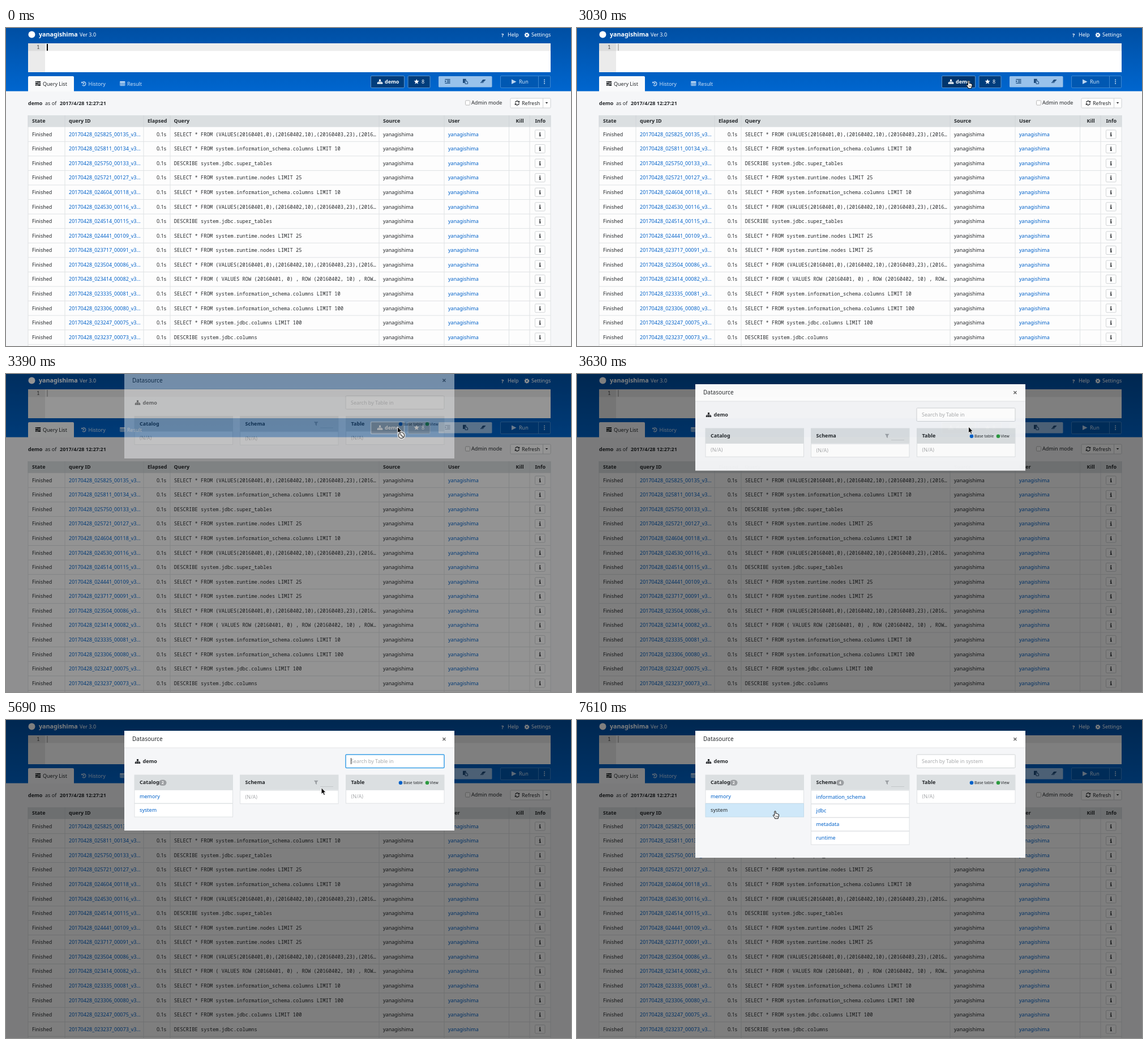
Write an HTML page that moves like this. It is 998x561 px and loops after 8 s.

```html
<!DOCTYPE html>
<html lang="en">
<head>
<meta charset="utf-8">
<title>Query console</title>
<style>
  html, body { margin: 0; width: 100%; height: 100%; overflow: hidden; background: #f5f6f8; }
  svg { display: block; width: 100vw; height: 100vh; }
  text { font: 9px "Noto Sans", sans-serif; white-space: pre; }
  .b { font-weight: 600; }
  .m { font: 8.75px "Noto Sans Mono", monospace; }
</style>
</head>
<body>
<svg id="stage" viewBox="0 0 998 561" preserveAspectRatio="none" xmlns="http://www.w3.org/2000/svg"></svg>
<script>
const LOOP = 8000;
const INK = '#25282b', LINK = '#0061c9', EDGE = '#dfe2e4', HEAD = '#dbdfe1';

// ---- drawing helpers ----
const rect = (x, y, w, h, fill, extra = '') =>
  `<rect x="${x}" y="${y}" width="${w}" height="${h}" fill="${fill}" ${extra}/>`;
const box = (x, y, w, h, fill, edge, r = 0, extra = '') =>
  rect(x + .5, y + .5, w - 1, h - 1, fill, `stroke="${edge}" rx="${r}" ${extra}`);
const text = (x, y, s, fill = INK, extra = '') => `<text x="${x}" y="${y}" fill="${fill}" ${extra}>${s}</text>`;
const bold = (x, y, s, fill = INK, extra = '') => text(x, y, s, fill, `class="b" ${extra}`);
const path = (d, fill, extra = '') => `<path d="${d}" fill="${fill}" ${extra}/>`;
const line = (d, color, w = 1) => path(d, 'none', `stroke="${color}" stroke-width="${w}"`);
const dot = (x, y, r, fill) => `<circle cx="${x}" cy="${y}" r="${r}" fill="${fill}"/>`;
const at = (x, y, s, extra = '') => `<g transform="translate(${x} ${y})" ${extra}>${s}</g>`;

// ---- icons, centred on their position ----
const sitemap = (x, y, c) => at(x, y,
  path('M-1.5-4h3v3h-3zM-4.7 1.2h2.9v2.8h-2.9zM-1.4 1.2h2.8v2.8h-2.8zM1.8 1.2h2.9v2.8h-2.9z', c) +
  line('M0-1V2M-3.2 2V.2H3.2V2', c, .9));
const server = (x, y, c, gap) => at(x, y,
  path('M-4.6-4h9.2v2.3h-9.2zM-4.6-1.1h9.2v2.3h-9.2zM-4.6 1.8h9.2v2.3h-9.2z', c) +
  line('M-3.6-2.8h1.6M0 0h3.6M-3.6 3h4', gap, .7));
const clock = (x, y, c) => at(x, y,
  line('M-2.6-2.2A3.5 3.5 0 1 1-2.5 2.5M.2-1.9V.5H-1.6', c, 1.2) + path('M-4.2-4V-.9H-1z', c));
const grid = (x, y, c) => at(x, y,
  line('M-4-3.4h8v7h-8zM-4-1h8M-4 1.3h8M-1.3-3.4v7M1.3-3.4v7', c, .9) + rect(-4.4, -3.9, 8.8, 1.8, c));
const refresh = (x, y, c) => at(x, y,
  line('M-3.4-.6A3.4 3.4 0 0 1 2.6-2.3M3.4.6A3.4 3.4 0 0 1-2.6 2.3', c, 1.3) +
  path('M4.2-4V-.8H1zM-4.2 4V.8H-1z', c));
const star = (x, y, c) => {
  const pts = Array.from({ length: 10 }, (_, i) => {
    const r = i % 2 ? 2.1 : 4.8, a = i * Math.PI / 5;
    return `${(r * Math.sin(a)).toFixed(2)},${(-r * Math.cos(a)).toFixed(2)}`;
  });
  return at(x, y, `<polygon points="${pts.join(' ')}" fill="${c}"/>`);
};
const gear = (x, y, c) => at(x, y,
  `<circle r="2.4" fill="none" stroke="${c}" stroke-width="2"/>` +
  `<circle r="3.7" fill="none" stroke="${c}" stroke-width="1.4" stroke-dasharray="1.5 1.406"/>`);
const info = (x, y) => at(x, y,
  path('M-1-3.6H.8v1.7H-1zM-1.6-1.2H.8v3.7h.8v1.1h-3.2v-1.1h.8v-2.6h-.8z', INK));
const funnel = (x, y) => at(x, y, path('M-3.8-3.6h7.6L1.2-.3v4L-1.2 2v-2.3z', '#9b9fa3'));

// ---- page ----
function header() {
  const pale = '#cfe1f5', dim = '#b9d4f0', navy = '#1d4b7d';
  return rect(0, 0, 998, 111.5, 'url(#sky)') +
    dot(45.5, 11.5, 6, '#fff') +
    bold(58, 14.8, 'yanagishima', '#fff', 'style="font-size:10.7px"') +
    text(130, 14.8, 'Ver 3.0', '#fff') +
    bold(875, 15.6, '?', '#fff', 'style="font-weight:800"') + text(886, 15.3, 'Help', '#fff') +
    gear(920, 12.3, '#fff') + text(928, 15.3, 'Settings', '#fff') +
    // editor
    rect(39, 27, 923, 51, '#fff') + rect(39, 27, 30, 51, '#ebebeb') +
    rect(39, 27, 30, 13.5, '#dcdcdc') + rect(69, 27, 893, 13.5, '#ededed') +
    text(54.3, 37.2, '1', '#333', 'class="m"') +
    rect(72, 28, 2, 12, '#000', 'id="caret"') + rect(72.5, 28, 1, 12, '#8a8a8a', 'id="thin"') +
    // tabs
    path('M39 112V87q0-2 2-2h77q2 0 2 2v25z', '#f9fafb') +
    server(56.5, 98, INK, '#f9fafb') + text(65, 101.8, 'Query List') +
    clock(137.3, 98.2, pale) + text(145.5, 101.8, 'History', pale) +
    grid(205.8, 98, pale) + text(214, 101.8, 'Result', pale) +
    // buttons
    box(644, 84, 60, 22, '#003d7c', '#5c93cb', 1.5, 'id="source"') +
    sitemap(660.5, 94.8, '#fff') + bold(669, 98, 'demo', '#fff') +
    box(709.5, 84, 40, 22, '#003d7c', '#5c93cb', 1.5) +
    star(725.2, 94.8, '#fff') + text(734, 98, '8', '#fff') +
    rect(764, 85, 94.5, 19.5, '#99c2eb', 'rx="1.5"') +
    at(780, 94, line('M-4.6-3.4h9.2M-1-1.1h5.6M-1 1.1h5.6M-4.6 3.4h9.2', navy, 1.2) + path('M-4.6-2L-2.2 0-4.6 2z', navy)) +
    at(811, 94, path('M-4-4.2h5.6v2.6H-.6V3H-4z', navy) + path('M0-1h2.8v2h1.8v3.5H0z', '#99c2eb', `stroke="${navy}"`)) +
    at(842.5, 94, path('M-.2-3h5.2L.3 3h-5.2z', navy) + line('M-3.4 1.8h3.8L2.6-.8', '#99c2eb', .7)) +
    box(873, 84, 89, 22, '#0058b2', '#3d87d2', 1.5) + line('M940.5 84.5v21', '#3d87d2') +
    path('M893 90.5l8.5 4.3-8.5 4.3z', dim) + text(906, 98, 'Run', '#d5e5f6') +
    [91.5, 94.7, 97.9].map(y => rect(950.2, y - .9, 1.8, 1.8, dim)).join('');
}

function subHeader() {
  return bold(39, 136, 'demo') + text(69, 136, 'as of') + bold(95, 136, '2017/4/28 12:27:21') +
    box(811, 127.5, 9, 9, '#fff', '#b8b8b8', 1.5) + text(822, 135.4, 'Admin mode') +
    box(890.5, 123.5, 72, 18, '#fff', '#cdd0d2', 1.5) + line('M948.5 124v17', '#cdd0d2') +
    refresh(903, 132.3, INK) + text(911, 135.5, 'Refresh') + path('M952.7 131h4.6l-2.3 2.6z', INK);
}

const QUERY = {
  values: 'SELECT * FROM (VALUES(20160401,0),(20160402,10),(20160403,23),(2016…',
  rows: 'SELECT * FROM ( VALUES ROW (20160401, 0) , ROW (20160402, 10) , ROW…',
  info: 'SELECT * FROM system.information_schema.columns LIMIT 10',
  info100: 'SELECT * FROM system.information_schema.columns LIMIT 100',
  tables: 'DESCRIBE system.jdbc.super_tables',
  nodes: 'SELECT * FROM system.runtime.nodes LIMIT 25',
  columns: 'SELECT * FROM system.jdbc.columns LIMIT 100',
  describe: 'DESCRIBE system.jdbc.columns'
};
const JOBS = `025825_00135 values,025811_00134 info,025750_00133 tables,025721_00127 nodes,
024604_00118 info,024530_00116 values,024514_00115 tables,024441_00109 nodes,023717_00091 nodes,
023504_00086 values,023414_00082 rows,023335_00081 info,023306_00080 info100,023247_00075 columns,
023237_00073 describe`.split(',').map(s => s.trim().split(' '));

function jobTable() {
  const pitch = 25.57, top = 174.7;
  let s = rect(39, 154, 923, 407, '#fdfdfd') + rect(39, 154, 923, 20.7, HEAD);
  JOBS.forEach(([id, query], i) => {
    const mid = top + pitch * (i + .5), y = mid + 3.3;
    s += line(`M39 ${top + pitch * (i + 1)}H962`, EDGE) +
      text(46, y, 'Finished') + text(111, y, `20170428_${id}_v3…`, LINK) +
      text(283, y, '0.1s', INK, 'text-anchor="end"') +
      text(296.7, y, QUERY[query], INK, 'class="m"') +
      text(666, y, 'yanagishima') + text(781, y, 'yanagishima', LINK) +
      box(934, mid - 8, 18.5, 16, '#fff', '#cfd2d4', 1.5) + info(943.3, mid);
  });
  for (const x of [39, 104, 243, 290, 659, 774, 888.5, 925, 962]) {
    s += line(`M${x} 154V174.7`, '#d0d5d8') + line(`M${x} 174.7V561`, EDGE);
  }
  const heads = { State: 46, 'query ID': 111, Elapsed: 250, Query: 296.5, Source: 666, User: 781, Kill: 900.5, Info: 934.5 };
  for (const [name, x] of Object.entries(heads)) s += bold(x, 167.2, name);
  return s;
}

// ---- dialog ----
const card = (x, name, h = 27) => rect(x, 96.5, 174.5, h, HEAD) + bold(x + 9.6, 113.3, name);
const cell = (x, y, h, label, color, fill = '#fff', id = '') =>
  box(x, y, 174.5, h, fill, EDGE, 0, id && `id="${id}Bg"`) +
  text(x + 9.6, y + h / 2 + 3.2, label, color, id && `id="${id}"`);
const badge = (x, n) => rect(x, 105.4, 13.5, 10.4, '#9c9fa2', 'rx="5.2"') +
  bold(x + 6.75, 113.2, n, '#fff', 'text-anchor="middle" style="font-size:7px"');
const none = (x, y) => cell(x, y, 24.5, '(N/A)', '#a9abad');

function dialog() {
  return rect(209, 19, 583, 100, '#f5f6f8', 'id="panel"') +
    rect(209, 19, 583, 30, '#fff') + line('M209 49H792', '#e4e6e8') +
    text(223, 37.3, 'Datasource', INK, 'style="font-size:10px"') +
    line('M771.4 31.2l5 5M776.4 31.2l-5 5', '#666', 1.5) +
    sitemap(232.5, 73, INK) + bold(241.5, 76, 'demo') +
    box(599.5, 60.5, 175, 24.5, '#fff', '#cfd2d4', 1.5, 'id="search"') +
    text(609, 76, '', '#a9abad', 'id="hint"') + rect(609, 67, 1, 11, '#333', 'id="searchCaret"') +
    card(226.5, 'Catalog') +
    `<g id="noCatalog">${none(226.5, 123)}</g>` +
    `<g id="catalogs">${badge(270, 2)}${cell(226.5, 123, 24.5, 'memory', LINK)}${cell(226.5, 147, 24.5, 'system', LINK, '#fff', 'pick')}</g>` +
    card(413, 'Schema') + funnel(547.7, 110.3) + line('M555 117.5h23', '#c3c7ca') +
    `<g id="noSchema">${none(413, 123.7)}</g>` +
    `<g id="schemas">${badge(458, 4)}${['information_schema', 'jdbc', 'metadata', 'runtime']
      .map((name, i) => cell(413, 123.7 + 24 * i, 24.7, name, LINK)).join('')}</g>` +
    card(600, 'Table') + none(600, 123) +
    dot(697, 110.7, 3.3, LINK) + text(702, 113.3, 'Base table', INK, 'style="font-size:7px"') +
    dot(744, 110.7, 3.3, '#2c9a3f') + text(748.5, 113.3, 'View', INK, 'style="font-size:7px"');
}

const tip = box(692.5, 106.5, 36, 16, '#f4f4f4', '#c4c4c4', 1) +
  text(697, 117.3, 'Ctrl + T', '#111', 'style="font-size:8px"');

const arrow = path('M0 0V11.2L2.6 8.9 4.4 13 6.4 12.1 4.6 8.2H8z', '#000', 'stroke="#fff" stroke-width=".9"');
const hand = path('M-1.1.8Q0-.5 1.1.8V4.6L2.4 4.3 3.3 5 4.6 4.9 5.3 5.8 6.4 6 6.5 9.3 5.3 11.6V13.4H-.6V12L-3.6 8.2Q-3.8 6.6-2.4 7L-1.1 8.2z',
  '#fff', 'stroke="#000" stroke-width=".95" stroke-linejoin="round"') + line('M1.2 8.4v2.4M2.9 8.4v2.4M4.5 8.4v2.4', '#000', .6);
const banned = at(7, 15.3, '<circle r="5.6" fill="none" stroke="#fff" stroke-width="3"/>' +
  '<circle r="5.3" fill="#eee" stroke="#555" stroke-width="1.6"/>' + line('M-3.6-3.6L3.6 3.6', '#555', 1.6));

const stage = document.getElementById('stage');
stage.innerHTML = `<defs><linearGradient id="sky" x2="0" y2="1">
  <stop stop-color="#004fa3"/><stop offset="1" stop-color="#0066cf"/></linearGradient></defs>` +
  rect(0, 0, 998, 561, '#f5f6f8') + header() + subHeader() + jobTable() +
  rect(0, 0, 998, 561, '#000', 'id="shade"') + `<g id="dialog">${dialog()}</g>` +
  `<g id="tip">${tip}</g><g id="mouse"><g id="banned">${banned}</g><g id="arrow">${arrow}</g><g id="hand">${hand}</g></g>`;

const el = {};
stage.querySelectorAll('[id]').forEach(n => { el[n.id] = n; });
const set = (id, props) => { for (const k in props) el[id].setAttribute(k, props[k]); };
const show = (id, on) => { el[id].style.display = on ? '' : 'none'; };

// ---- motion ----
const flips = (t, times) => times.filter(x => t >= x).length % 2 === 1;
// value of the latest [time, value] entry
const held = (t, keys) => keys.reduce((v, [time, next]) => t >= time ? next : v, 0);

function glide(t, start, end, steps, from, to) {
  const k = Math.floor((t - start) / (end - start) * steps + .01);
  const p = Math.min(1, Math.max(0, k / steps)), e = p * p * (3 - 2 * p);
  return from.map((v, i) => v + (to[i] - v) * e);
}

const BUTTON = [691.5, 93], ROW = [350, 160.5];

function draw(t) {
  show('caret', t < 2740 && !flips(t, [440, 950, 1550, 2000, 2590]));
  show('thin', t >= 2740);

  const [x, y] = t < 5000 ? glide(t, 1700, 2590, 6, [988, 167], BUTTON) : glide(t, 5242, 6270, 7, BUTTON, ROW);
  const onButton = t < 3180 && x < 704 && y < 106;
  const onRow = t > 5000 && x < 401 && y > 123;
  set('mouse', { transform: `translate(${x} ${y})` });
  show('mouse', t >= 1700);
  show('hand', onButton || onRow);
  show('arrow', !onButton && !onRow);
  show('banned', t >= 3180 && t < 3630);

  const focus = t >= 3180;
  set('source', { fill: onButton || focus ? '#00356d' : '#003d7c', stroke: focus ? '#8fbdec' : '#5c93cb', 'stroke-width': focus ? 1.6 : 1 });

  set('shade', { opacity: held(t, [[3180, .13], [3390, .42], [3630, .5]]) });
  set('dialog', {
    opacity: held(t, [[3390, .45], [3630, .97], [3890, 1]]),
    transform: `translate(0 ${held(t, [[3390, -22.5], [3630, -1], [3890, 0]])})`
  });
  show('dialog', t >= 3390);

  const loaded = t >= 3890, picked = t >= 7460, filled = t >= 7610;
  set('panel', { height: filled ? 224 : loaded ? 176 : 152.5 });
  show('noCatalog', !loaded);
  show('catalogs', loaded);
  show('noSchema', !filled);
  show('schemas', filled);
  set('pick', { fill: picked ? INK : onRow && y > 147 ? '#004690' : LINK });
  set('pickBg', { fill: picked ? '#cfe8f9' : '#fff', stroke: picked ? '#c3dcec' : EDGE });

  const typing = loaded && !picked;
  set('search', { stroke: typing ? '#3a9fe6' : '#cfd2d4', 'stroke-width': typing ? 1.5 : 1 });
  el.hint.textContent = 'Search by Table in' + (picked ? ' system' : '');
  show('searchCaret', typing && flips(t, [3890, 4190, 4490, 5090, 5540, 5990, 6560, 7160]));

  set('tip', { opacity: held(t, [[4490, .5], [4640, 1], [5390, 0]]) });
}

const began = performance.now();
function tick() {
  draw((performance.now() - began) % LOOP);
  requestAnimationFrame(tick);
}
tick();
</script>
</body>
</html>
```
